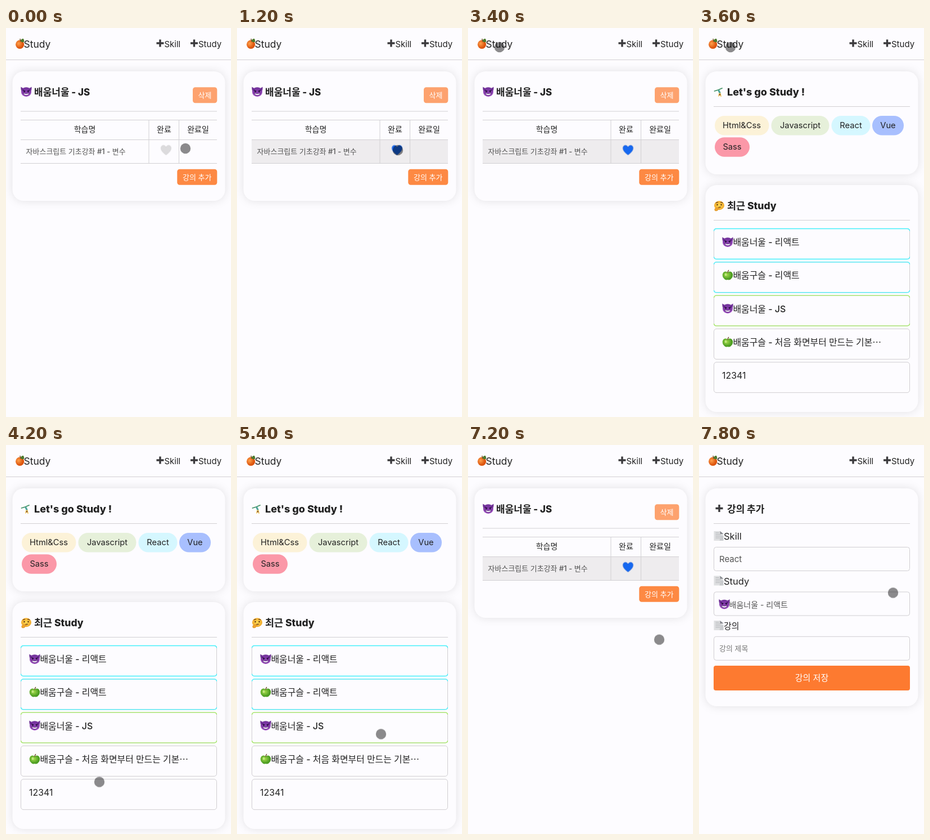
An HTML page for the animation above (8000 ms loop, 400 by 691 pixels).

```html
<!DOCTYPE html>
<html lang="ko">
<head>
<meta charset="utf-8">
<title>Study</title>
<style>
  html, body { margin: 0; width: 100%; height: 100%; overflow: hidden; background: #fdfcff; }
  svg.stage { display: block; width: 100vw; height: 100vh; }
  text { font: 15px Inter, "Noto Sans CJK KR", sans-serif; fill: #222; }
  .card { fill: #fdfcff; filter: drop-shadow(0 0 8px rgba(0, 0, 0, .11)); }
  .rule { stroke: #d2d0d3; fill: none; }
  .title { font-weight: 800; font-size: 17px; }
  .head { font-weight: 500; font-size: 14px; }
  .mid { text-anchor: middle; }
  .small { font-size: 13px; }
  .label { font-size: 16.5px; }
  .item { font-size: 15.9px; font-weight: 500; }
  .chip { font-size: 14.7px; text-anchor: middle; }
  .soft { fill: #555; }
  .hint { fill: #777; }
  .white { fill: #fff; }
  .cyan { stroke: #45f0fb; }
  .lime { stroke: #a3ea62; }

  .detail { animation: detail 8s step-end infinite; }
  .home { animation: home 8s step-end infinite; }
  .form { animation: form 8s step-end infinite; }
  .done { animation: done 8s step-end infinite; }
  .todo { animation: todo 8s step-end infinite; }
  .pointer { fill: #000; fill-opacity: .45; animation: pointer 8s infinite; }

  @keyframes detail { 0%, 70% { visibility: visible } 45%, 95%, 100% { visibility: hidden } }
  @keyframes home { 0%, 70%, 100% { visibility: hidden } 45% { visibility: visible } }
  @keyframes form { 0% { visibility: hidden } 95%, 100% { visibility: visible } }
  @keyframes done { 0% { opacity: 0 } 12.5%, 100% { opacity: 1 } }
  @keyframes todo { 0% { opacity: 1 } 12.5%, 100% { opacity: 0 } }
  /* the pointer is refreshed every 200 ms */
  @keyframes pointer {
    0% { transform: translate(319px, 214px); animation-timing-function: steps(2) }
    5% { transform: translate(286px, 217px); animation-timing-function: step-end }
    15% { transform: translate(286px, 217px); animation-timing-function: steps(6) }
    30% { transform: translate(81px, 64.5px); animation-timing-function: steps(2) }
    35% { transform: translate(60px, 10px); animation-timing-function: steps(3) }
    42.5% { transform: translate(56px, 34px); animation-timing-function: step-end }
    45% { transform: translate(56px, 34px); animation-timing-function: steps(3) }
    52.5% { transform: translate(166px, 598.5px); animation-timing-function: steps(3) }
    60% { transform: translate(190px, 565px); animation-timing-function: steps(3) }
    67.5% { transform: translate(256px, 513.5px); animation-timing-function: step-end }
    70% { transform: translate(256px, 513.5px); animation-timing-function: steps(3) }
    77.5% { transform: translate(382px, 25px); animation-timing-function: step-end }
    80% { transform: translate(384px, 12px); animation-timing-function: steps(2) }
    85% { transform: translate(330px, 512px); animation-timing-function: steps(3) }
    92.5%, 100% { transform: translate(345px, 262.5px); animation-timing-function: step-end }
  }
</style>
</head>
<body>
<svg class="stage" viewBox="0 0 400 691" preserveAspectRatio="none">
  <defs>
    <radialGradient id="peel" cx=".35" cy=".4"><stop stop-color="#ffa04a"/><stop offset="1" stop-color="#dd560f"/></radialGradient>
    <radialGradient id="green" cx=".4" cy=".4"><stop stop-color="#a5dd4b"/><stop offset="1" stop-color="#4d9d22"/></radialGradient>
    <linearGradient id="violet" x2="0" y2="1"><stop stop-color="#6f2f98"/><stop offset="1" stop-color="#a04fc4"/></linearGradient>
    <radialGradient id="yellow"><stop stop-color="#ffdb55"/><stop offset="1" stop-color="#f0a92b"/></radialGradient>

    <!-- icons are centred on 0,0 -->
    <g id="orange">
      <ellipse cx="-.3" cy="1.200" rx="7.600" ry="7.800" fill="url(#peel)"/>
      <path d="M1-4Q1-9 6-9Q8-6 7-3Q4-2 1-4" fill="#4c7a2c"/>
      <path d="M1-4l-1-5" stroke="#6b4a22" stroke-width="1.300"/>
    </g>
    <g id="devil">
      <path d="M-9.500-8.500Q-10-3-8 0L-3-6Q-7-6-9.500-8.500M9.500-8.500Q10-3 8 0L3-6Q7-6 9.500-8.500" fill="#6b2f92"/>
      <ellipse cy=".6" rx="9" ry="8.400" fill="url(#violet)"/>
      <path d="M-6.500-3l5 2.500M6.500-3l-5 2.500" stroke="#3d155c" stroke-width="1.400"/>
      <circle cx="-3.600" cy="-.2" r="1.300" fill="#28103c"/>
      <circle cx="3.600" cy="-.2" r="1.300" fill="#28103c"/>
      <path d="M-5.500 2.500Q0 4.500 5.500 2.500Q4 6.800 0 6.800T-5.500 2.500" fill="#f3e6fa" stroke="#3d155c" stroke-width=".8"/>
    </g>
    <g id="apple">
      <path d="M0-5Q4-8 7.500-5Q11 0 7.500 5Q4 10 0 8Q-4 10-7.500 5Q-11 0-7.500-5Q-4-8 0-5" fill="url(#green)"/>
      <path d="M0-4Q0-7 2-9" stroke="#6b4426" stroke-width="1.400" fill="none"/>
      <ellipse cx="-3.500" cy="-1" rx="1.800" ry="2.500" fill="#d5f19a" opacity=".7"/>
    </g>
    <path id="heart" d="M0 9Q-9 2.500-9-3C-9-9.500-1.500-9.500 0-4.500C1.500-9.500 9-9.500 9-3Q9 2.500 0 9Z"/>
    <path id="plus" d="M-6.500 0H6.500M0-6.500V6.500" stroke="#3b3a3d" stroke-width="3.400"/>
    <g id="paper">
      <path d="M-9-8H2l5 5V9H-9Z" fill="#dedfe1"/>
      <path d="M2-8v5h6Z" fill="#85888e"/>
      <path d="M-6-5h6M-6-2h10M-6 1h10M-6 4h8" stroke="#b4b6ba"/>
      <path d="M3 0h5v9H1Z" fill="#c9cbce"/>
    </g>
    <g id="thinker">
      <ellipse rx="9" ry="8" cy="-.8" fill="url(#yellow)"/>
      <path d="M-6-5q2-2 4-1M2-6q3-1 4 1M-2 3.500q3-2 5-1" stroke="#65401c" stroke-width="1.200" fill="none"/>
      <circle cx="-3.500" cy="-2" r="1.200" fill="#4b2c12"/>
      <circle cx="3.500" cy="-2" r="1.200" fill="#4b2c12"/>
      <path d="M-8 5l4-2 5 1-3 2q0 3-4 3-3 0-2-4" fill="#f0a52d" stroke="#d18a22" stroke-width=".6"/>
    </g>
    <g id="gymnast" fill="none" stroke-linecap="round">
      <path d="M-7.500-2L-1-4L6-7" stroke="#3f8f62" stroke-width="1.800"/>
      <path d="M0-3L2 1" stroke="#4aa39a" stroke-width="3"/>
      <path d="M1 2L0 7M3 2L4 7.500" stroke="#f2c24c" stroke-width="1.500"/>
      <circle cx="2" cy="4.500" r="1.400" fill="#8a5a30"/>
    </g>
    <rect id="box" x="26.500" width="348" height="54" rx="4.500" fill="none" stroke="#d0ced1"/>
    <path id="edges" d="M26.500 4Q27 0 31 0H370Q374.500 0 374.500 4M26.500 50Q27 54 31 54H370Q374.500 54 374.500 50" fill="none" stroke-width="1.300"/>
    <rect id="field" x="26.500" width="348" height="42" rx="4" fill="none" stroke="#d0ced1"/>
  </defs>

  <rect width="400" height="691" fill="#fdfcff"/>

  <path class="rule" d="M0 56.500H400"/>
  <use href="#orange" x="25" y="28"/>
  <text x="31.500" y="35" style="font-size:17.500px">Study</text>
  <use href="#plus" x="274" y="27"/>
  <text x="281.500" y="33.500">Skill</text>
  <use href="#plus" x="334.500" y="27"/>
  <text x="342" y="33.500">Study</text>

  <g class="detail">
    <rect class="card" x="11.500" y="77" width="378" height="230" rx="20"/>
    <use href="#devil" x="36" y="113"/>
    <text class="title" x="50" y="119.500">배움너울 - JS</text>
    <rect x="332" y="105.300" width="43.300" height="28" rx="4.500" fill="#fda26e"/>
    <text class="small mid white" x="353.500" y="124">삭제</text>
    <rect class="done" x="26" y="199" width="349" height="41" fill="#eeecee"/>
    <path class="rule" d="M26 148H375M26 163.500H375M26 198.500H375M26 240.500H375M254 163V240M307.500 163V240"/>
    <text class="head mid" x="140" y="184.500">학습명</text>
    <text class="head mid" x="281" y="184.500">완료</text>
    <text class="head mid" x="341.500" y="184.500">완료일</text>
    <text class="small soft" x="35.500" y="223.500" font-weight="500" style="font-weight:500">자바스크립트 기초강좌 #1 - 변수</text>
    <use class="todo" href="#heart" x="284.500" y="216.500" fill="#dcdbdd" stroke="#c9c8ca" stroke-width=".6"/>
    <use class="done" href="#heart" x="284.500" y="216.500" fill="#1668f0" stroke="#0a50cc" stroke-width=".6"/>
    <rect x="304.300" y="250.700" width="71" height="28" rx="4.500" fill="#fd8943"/>
    <text class="small mid white" x="339.800" y="270">강의 추가</text>
  </g>

  <g class="home">
    <rect class="card" x="11.500" y="77" width="378" height="183" rx="20"/>
    <use href="#gymnast" x="35" y="114"/>
    <text class="title" x="50" y="120" style="font-size:18px">Let's go Study !</text>
    <path class="rule" d="M26 139.500H375"/>
    <rect x="28" y="156" width="96.500" height="34.500" rx="17.200" fill="#fcf2d8"/>
    <text class="chip" x="76" y="177.500">Html&amp;Css</text>
    <rect x="128.500" y="156" width="103" height="34.500" rx="17.200" fill="#e6f0da"/>
    <text class="chip" x="180" y="177.500">Javascript</text>
    <rect x="235.500" y="156" width="69" height="34.500" rx="17.200" fill="#d5f7ff"/>
    <text class="chip" x="270" y="177.500">React</text>
    <rect x="308" y="156" width="56" height="34.500" rx="17.200" fill="#a8bffe"/>
    <text class="chip" x="336" y="177.500">Vue</text>
    <rect x="28" y="194.200" width="62" height="34.500" rx="17.200" fill="#fb98a8"/>
    <text class="chip" x="59" y="216">Sass</text>

    <rect class="card" x="11.500" y="279" width="378" height="403" rx="20"/>
    <use href="#thinker" x="36" y="316"/>
    <text class="title" x="50" y="322" style="font-size:17.500px">최근 Study</text>
    <path class="rule" d="M26 341.500H375"/>
    <use href="#box" y="356.500"/>
    <use href="#edges" y="356.500" class="cyan"/>
    <use href="#devil" x="51" y="380"/>
    <text class="item" x="60.500" y="385.500">배움너울 - 리액트</text>
    <use href="#box" y="415.800"/>
    <use href="#edges" y="415.800" class="cyan"/>
    <use href="#apple" x="51" y="439"/>
    <text class="item" x="60.500" y="445">배움구슬 - 리액트</text>
    <use href="#box" y="475.100"/>
    <use href="#edges" y="475.100" class="lime"/>
    <use href="#devil" x="51" y="498"/>
    <text class="item" x="60.500" y="504.500">배움너울 - JS</text>
    <use href="#box" y="534.400"/>
    <use href="#apple" x="51" y="558"/>
    <text class="item" x="60.500" y="563.500">배움구슬 - 처음 화면부터 만드는 기본⋯</text>
    <use href="#box" y="593.700"/>
    <text class="item" x="41" y="623" style="font-weight:400">12341</text>
  </g>

  <g class="form">
    <rect class="card" x="11.500" y="77" width="378" height="387" rx="20"/>
    <use href="#plus" x="36" y="112.500"/>
    <text class="title" x="50" y="119.500">강의 추가</text>
    <path class="rule" d="M26 139.500H375"/>
    <use href="#paper" x="35.500" y="161"/>
    <text class="label" x="44" y="168">Skill</text>
    <use href="#field" y="181.500"/>
    <text class="soft" x="36" y="207.500">React</text>
    <use href="#paper" x="35.500" y="240.500"/>
    <text class="label" x="44" y="247.500">Study</text>
    <use href="#field" y="261"/>
    <use href="#devil" x="45" y="282.500"/>
    <text class="soft" x="53.500" y="288.500" style="font-size:14px">배움너울 - 리액트</text>
    <use href="#paper" x="35.500" y="320"/>
    <text x="44" y="326.500" style="font-weight:500">강의</text>
    <use href="#field" y="340.300"/>
    <text class="small hint" x="36" y="365.500">강의 제목</text>
    <rect x="26" y="392" width="349" height="44" rx="4" fill="#fd7a30"/>
    <text class="mid white" x="200.500" y="419">강의 저장</text>
  </g>

  <circle class="pointer" r="9.200"/>
</svg>
</body>
</html>
```
